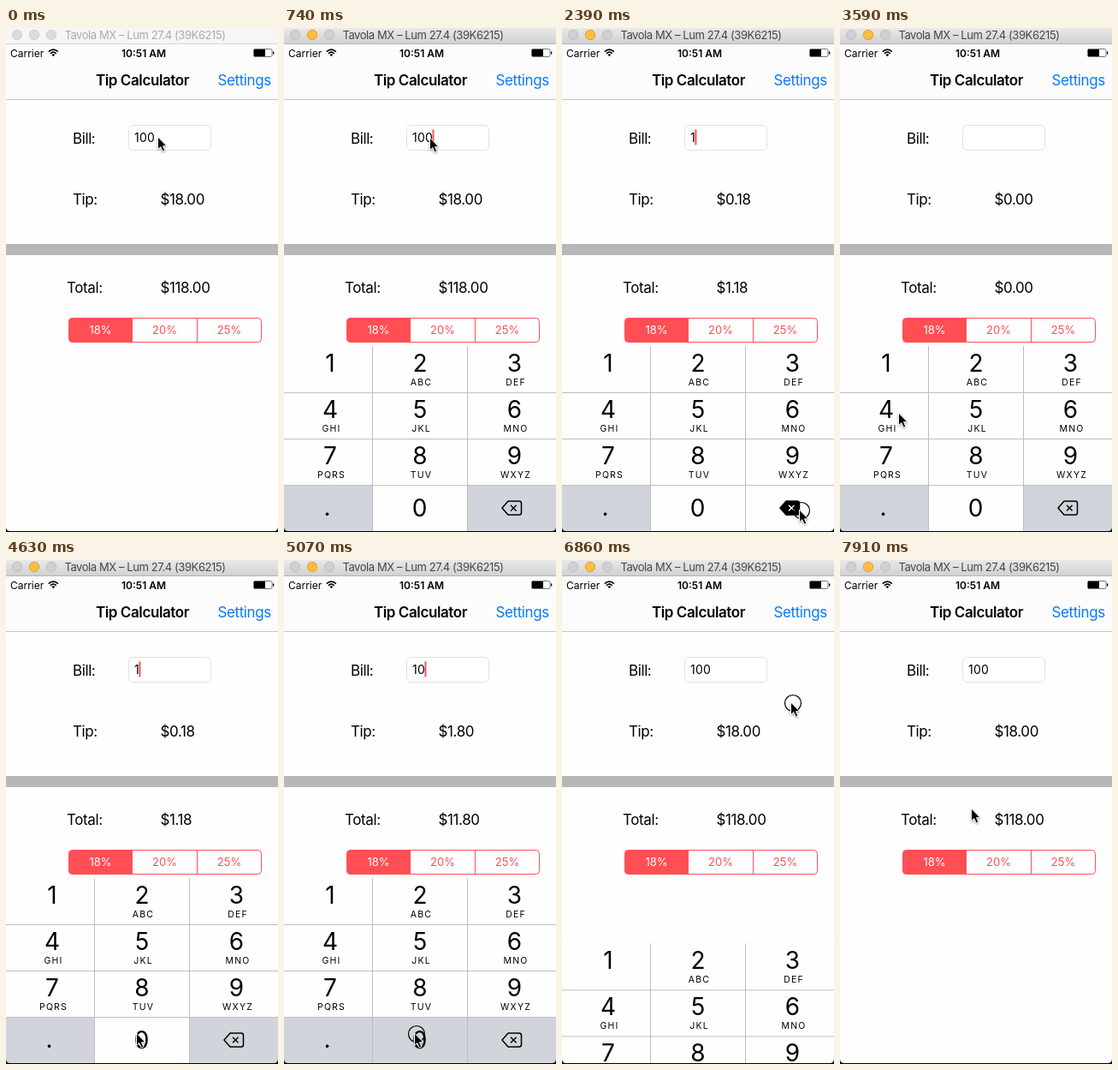
Write an HTML page that moves like this. It is 318 by 588 pixels and loops after 8 s.

```html
<!DOCTYPE html>
<html lang="en">
<head>
<meta charset="utf-8">
<title>Tip Calculator</title>
<style>
  html, body { margin: 0; width: 100%; height: 100%; overflow: hidden; background: #fff; }
  svg { display: block; width: 318px; height: 588px; }
  text { font: 17px Inter, "Open Sans", sans-serif; letter-spacing: -.4px; white-space: pre; }
  .mid { text-anchor: middle; }
  .bold { font-weight: 600; }
  .amount { letter-spacing: -.4px; }
  .small { font-size: 12px; letter-spacing: 0; }
  .window { font-size: 13px; letter-spacing: -.42px; }
  .field { font-size: 14px; letter-spacing: .2px; }
  .segment { font-size: 13px; letter-spacing: 0; fill: #ff4f55; }
  .digit { font-size: 28px; letter-spacing: 0; }
  .letters { font-size: 10.5px; letter-spacing: 1.2px; }
</style>
</head>
<body>
<svg viewBox="0 0 318 588">
  <defs>
    <linearGradient id="chrome" x2="0" y2="1">
      <stop stop-color="#e9e9e9"/><stop offset="1" stop-color="#d2d2d2"/>
    </linearGradient>
  </defs>
  <rect width="318" height="588" fill="#fefefe"/>

  <rect id="bar" width="318" height="18"/>
  <path id="barLine" d="M0 18.5H318"/>
  <g id="dots"><circle cx="13" cy="8" r="5.7"/><circle cx="33" cy="8" r="5.7"/><circle cx="53" cy="8" r="5.7"/></g>
  <text id="barText" class="window mid" x="162.5" y="13">Tavola MX – Lum 27.4 (39K6215)</text>

  <rect y="19" width="318" height="64" fill="#fcfcfc"/>
  <path d="M0 83.5H318" stroke="#c4c4c4"/>
  <text class="small" x="5" y="33.5">Carrier</text>
  <g fill="none" stroke="#000" stroke-width="1.6">
    <path d="M49.8 27.6Q55.3 22.6 60.8 27.6M51.9 29.8Q55.3 26.6 58.7 29.8"/>
    <path d="M53.4 31L55.3 33.2 57.2 31Q55.3 29.6 53.4 31Z" fill="#000" stroke="none"/>
  </g>
  <text class="small bold mid" x="161" y="33.5">10:51 AM</text>
  <rect x="289.5" y="24.5" width="21.5" height="9" rx="1.5" fill="none" stroke="#777"/>
  <path d="M290 25H303V33H290ZM312 27.5H313.3V30.5H312Z"/>
  <text class="bold mid" x="159.5" y="67">Tip Calculator</text>
  <text x="247.5" y="67" fill="#087aff">Settings</text>

  <text x="78" y="134.5">Bill:</text>
  <rect x="143.5" y="113.5" width="96" height="29" rx="5" fill="#fff" stroke="#e1e1e1"/>
  <text id="bill" class="field" x="150" y="133"></text>
  <rect id="caret" y="118.5" width="2" height="18" fill="#ff4f55"/>
  <text x="78" y="205.5">Tip:</text>
  <text id="tip" class="amount" x="180.5" y="205.5"></text>
  <rect y="252" width="318" height="13" fill="#b7b7b7"/>
  <text x="71" y="308.5">Total:</text>
  <text id="total" class="amount" x="180.5" y="308.5"></text>

  <path d="M148 338.5H77.5a4 4 0 0 0-4 4V362.5a4 4 0 0 0 4 4H148Z" fill="#ff4f55"/>
  <rect x="73.5" y="338.5" width="225" height="28" rx="4" fill="none" stroke="#ff4f55"/>
  <path d="M223.5 338V367" stroke="#ff4f55"/>
  <text class="segment mid" x="110.5" y="357" style="fill:#fff">18%</text>
  <text class="segment mid" x="185.5" y="357">20%</text>
  <text class="segment mid" x="261" y="357">25%</text>

  <g id="keyboard">
    <rect y="371" width="318" height="217" fill="#fefefe"/>
    <rect y="533" width="103" height="55" fill="#d1d5db"/>
    <rect id="oneKey" y="371" width="103" height="54"/>
    <rect id="zeroKey" x="104" y="533" width="110" height="55"/>
    <rect id="deleteKey" x="215" y="533" width="103" height="55"/>
    <path d="M103.5 371V588M214.5 371V588M0 425.5H318M0 479.5H318M0 533.5H318" stroke="#bdbec2" fill="none"/>
    <g id="digits"></g>
    <text class="digit mid" x="50.5" y="568.5">.</text>
    <text class="digit mid" x="158.5" y="570">0</text>
    <path id="deleteIcon" d="M262 552H275Q277.5 552 277.5 554.5V565.5Q277.5 568 275 568H262L255 560Z"
      stroke="#000" stroke-width="1.5" stroke-linejoin="round"/>
    <path id="deleteCross" d="M265 556.7L271.6 563.3M271.6 556.7L265 563.3" stroke-width="1.4"/>
  </g>

  <path d="M0 582Q0 587 5 587H313Q318 587 318 582V588H0Z"/>
  <g id="pointer">
    <circle id="ring" cx="3" cy="1" r="9.5" fill="none" stroke="#000" stroke-width="1.2"/>
    <path id="arrow" d="M.5 0V14.6L3.8 11.6 6.2 17 8.8 15.9 6.5 10.7H11Z" fill="#000" stroke="#fff"
      style="filter:drop-shadow(0 1px 1px #0006)"/>
  </g>
</svg>
<script>
const LOOP = 8000, KEYBOARD_HEIGHT = 217;
const FOCUS = 290, BLUR = 6860;
const $ = id => document.getElementById(id);
const set = (id, attrs) => {
  for (const name in attrs) $(id).setAttribute(name, attrs[name]);
};

// time, x, y of the pointer tip
const path = [
  [0, 177, 127], [140, 170, 128], [1040, 170, 128], [1190, 158, 215], [1340, 125, 424],
  [1490, 125, 424], [1640, 86, 440], [1790, 165, 520], [1940, 262, 558], [2090, 277, 562],
  [3140, 277, 562], [3290, 240, 540], [3440, 135, 485], [3590, 68, 449], [3740, 57, 410],
  [3890, 54, 393], [4190, 54, 393], [4330, 96, 460], [4480, 143, 540], [4628, 152, 552],
  [5520, 152, 552], [5673, 200, 555], [5822, 251, 553], [5970, 264, 490], [6120, 266, 370],
  [6270, 267, 260], [6420, 267, 190], [6560, 267, 166], [7463, 267, 166], [7612, 240, 200],
  [7762, 190, 256], [7911, 153, 290]
];
const presses = [
  [290, 440, "field"], [2090, 2240, "delete"], [2390, 2540, "delete"], [2840, 2990, "delete"],
  [4040, 4190, "one"], [4770, 4920, "zero"], [5070, 5220, "zero"], [6860, 7010, "page"]
];
const bills = [
  [0, "100"], [2090, "10"], [2390, "1"], [2840, ""], [4190, "1"], [4920, "10"], [5220, "100"]
];

const letters = ["", "ABC", "DEF", "GHI", "JKL", "MNO", "PQRS", "TUV", "WXYZ"];
$("digits").innerHTML = letters.map((label, i) => {
  const x = [54, 159, 269.5][i % 3], y = 401 + 54 * Math.floor(i / 3);
  return `<text class="digit mid" x="${x}" y="${y}">${i + 1}</text>
    <text class="letters mid" x="${x + 1.5}" y="${y + 15.5}">${label}</text>`;
}).join("");

// The screen refreshes about every 150 ms.
function heldTime(t) {
  if (t < 140) return 0;
  if (t < 4325) return 140 + 150 * Math.floor((t - 140) / 150);
  return 4330 + 149.2 * Math.floor((t - 4325) / 149.1);
}

function pointerAt(t) {
  const next = path.findIndex(p => p[0] > t);
  if (next < 0) return path.at(-1).slice(1);
  const [t0, x0, y0] = path[next - 1], [t1, x1, y1] = path[next];
  const part = (t - t0) / (t1 - t0);
  return [x0 + (x1 - x0) * part, y0 + (y1 - y0) * part];
}

// Critically damped spring from 0 to 1
function spring(ms) {
  const x = Math.max(0, ms) * .022;
  return 1 - (1 + x) * Math.exp(-x);
}

function drawWindow(active) {
  set("bar", { fill: active ? "url(#chrome)" : "#f6f6f6" });
  set("barLine", { stroke: active ? "#b4b4b4" : "#d5d5d5" });
  set("barText", { fill: active ? "#464646" : "#aaa" });
  [...$("dots").children].forEach((dot, i) => {
    const yellow = active && i === 1;
    dot.setAttribute("fill", yellow ? "#fdbd3f" : active ? "#d0d0d0" : "#dcdcdc");
    dot.setAttribute("stroke", yellow ? "#e0a032" : active ? "#bfbfbf" : "#d0d0d0");
  });
}

function draw(t) {
  drawWindow(t >= 140);

  const [since, bill] = bills.findLast(b => b[0] <= t);
  $("bill").textContent = bill;
  $("tip").textContent = "$" + (bill * .18).toFixed(2);
  $("total").textContent = "$" + (bill * 1.18).toFixed(2);

  const blink = (t - Math.max(since, FOCUS)) % 1000;
  const caretOn = t >= FOCUS && t < BLUR && blink < 500;
  const width = bill ? $("bill").getComputedTextLength() : 0;
  set("caret", { x: 149.5 + width, opacity: caretOn ? 1 : 0 });

  const shown = spring(t - FOCUS) * (1 - spring(t - BLUR + 50));
  set("keyboard", {
    transform: `translate(0 ${KEYBOARD_HEIGHT * (1 - shown)})`,
    visibility: shown < .003 ? "hidden" : "visible"
  });

  const press = presses.find(([from, to]) => t >= from && t < to);
  const key = press && press[2];
  const deleting = key === "delete";
  set("oneKey", { fill: key === "one" ? "#d1d5db" : "#fefefe" });
  set("zeroKey", { fill: key === "zero" ? "#d1d5db" : "#fefefe" });
  set("deleteKey", { fill: deleting ? "#fefefe" : "#d1d5db" });
  set("deleteIcon", { fill: deleting ? "#000" : "none" });
  set("deleteCross", { stroke: deleting ? "#fff" : "#000" });

  set("pointer", { transform: `translate(${pointerAt(t)})` });
  set("ring", { opacity: press ? 1 : 0 });
}

const start = performance.now();
function tick() {
  draw(heldTime((performance.now() - start) % LOOP));
  requestAnimationFrame(tick);
}
tick();
</script>
</body>
</html>
```
